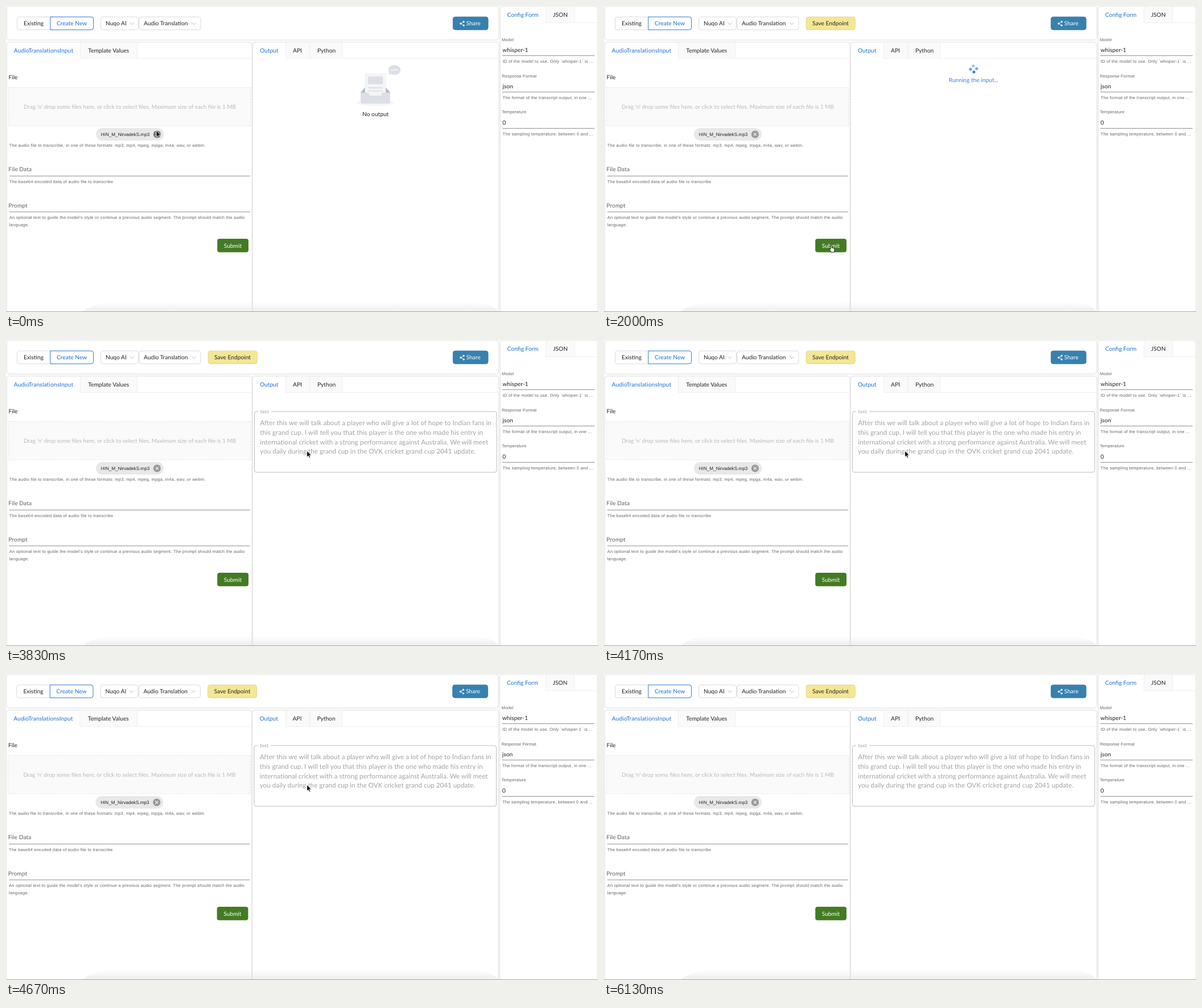
Recreate the animation shown at these times as an HTML page. Size 1040 by 539 pixels, loop 6.43 s.

```html
<!DOCTYPE html>
<html lang="en">
<head>
<meta charset="utf-8">
<title>Audio translation form</title>
<style>
  html, body { margin: 0; width: 100%; height: 100%; overflow: hidden; background: #fff; }
  svg { display: block; width: 100vw; height: 100vh; }
  text { font: 10.2px Lato, sans-serif; fill: #262626; text-rendering: geometricPrecision; white-space: pre; }
  .mid { text-anchor: middle; }
  .blue { fill: #1d6fd3; }
  .title { letter-spacing: .13px; }
  .pale { font-size: 9.96px; fill: #b9b9b9; }
  .label { fill: #606060; letter-spacing: .1px; }
  .value { fill: #222; letter-spacing: .04px; }
  .white { fill: #fff; }
  .note, .tiny { font: 7.5px "Liberation Sans", Arial, sans-serif; fill: #666; letter-spacing: .23px; }
  .tiny { letter-spacing: .1px; }
  .chip { font: 8.15px "Liberation Sans", Arial, sans-serif; fill: #222; text-anchor: middle; }
  .result { font-size: 11.6px; fill: #a2a2a2; letter-spacing: .06px; }
  .legend { font-size: 8.7px; fill: #a2a2a2; letter-spacing: .08px; }
  .panel { fill: #fff; stroke: #e8e8e8; filter: drop-shadow(0 0 1px #ddd); }
  .box { fill: #fff; stroke: #d9d9d9; }
  .tab { fill: #fafafa; stroke: #efefef; }
  .rule { stroke: #8f8f8f; }
  .thin { stroke: #efefef; }
  .chevron { fill: none; stroke: #bcbcbc; }
</style>
</head>
<body>
<svg viewBox="0 0 1040 539">
  <defs>
    <linearGradient id="shade" x2="0" y2="1">
      <stop offset="0" stop-color="#ddd" stop-opacity="0"/>
      <stop offset="1" stop-color="#ddd" stop-opacity=".5"/>
    </linearGradient>
  </defs>
  <g id="page">
    <rect class="panel" x="1.5" y=".5" width="864" height="59" rx="5"/>
    <rect class="panel" x="1.5" y="64" width="430.5" height="475" rx="4"/>
    <rect class="panel" x="433.5" y="64" width="432" height="475" rx="4"/>
    <rect class="panel" x="868.5" y=".5" width="171" height="539" rx="4"/>
    <path fill="url(#shade)" d="M135 538C150 526 175 521 205 521H815C842 521 858 528 865 538Z"/>
    <path stroke="#a6a6a6" d="M0 538.5H1040"/>

    <path class="thin" d="M131 92.5H431M491 92.5H865M948 29.5H1040"/>
    <g class="tab">
      <path d="M130.5 92.5V68q0-4 4-4H227q4 0 4 4V92.5Z"/>
      <path d="M491.5 92.5V68q0-4 4-4H529q4 0 4 4V92.5Z"/>
      <path d="M534.5 92.5V68q0-4 4-4H587q4 0 4 4V92.5Z"/>
      <path d="M948.5 29.5V4.5q0-4 4-4H995q4 0 4 4V29.5Z"/>
    </g>

    <rect class="box" x="19.5" y="19.2" width="66" height="22.7" rx="4"/>
    <path fill="#fff" stroke="#2a78d6" d="M77.8 19.2H149.6q4 0 4 4V37.9q0 4-4 4H77.8Z"/>
    <rect class="box" x="166.5" y="19.2" width="66" height="22.7" rx="4"/>
    <rect class="box" id="task" x="234" y="19.2" width="108" height="22.7" rx="4"/>
    <path class="chevron" d="M217.5 28.8l3.5 4 3.5-4M326.5 28.8l3.5 4 3.5-4"/>
    <rect x="785.3" y="19.2" width="61.6" height="22.7" rx="4" fill="#3781af" stroke="#3279a5"/>
    <g fill="#fff" stroke="#fff" stroke-width=".9">
      <path fill="none" d="M804 28l-5.3 3 5.3 3"/>
      <circle cx="804" cy="27.8" r="1.2"/><circle cx="798.7" cy="31" r="1.2"/><circle cx="804" cy="34.2" r="1.2"/>
    </g>

    <rect x="4.5" y="143.5" width="425.5" height="67.5" fill="#fafafa" stroke="#e4e4e4" stroke-dasharray="3 2"/>
    <rect x="158" y="215" width="119" height="22" rx="11" fill="#e8e8e8"/>
    <circle id="remove" cx="265.4" cy="226" r="6.6"/>
    <path stroke="#eee" stroke-width="1.2" d="M262.9 223.5l5 5m0-5l-5 5"/>
    <path class="rule" d="M6 299.5H429M6 362.7H429M872 87.5H1034M872 151.5H1034M872 215.5H1034"/>
    <rect x="371.2" y="409.9" width="54.8" height="23.8" rx="4" fill="#437b23"/>
    <g id="labels"></g>

    <g id="save">
      <rect x="355.2" y="19.2" width="86" height="22.7" rx="4" fill="#f4e794" stroke="#e0d698"/>
      <text class="mid" x="398" y="34.4">Save Endpoint</text>
    </g>
    <g id="empty">
      <g transform="translate(605 104) scale(.479)">
        <g transform="translate(24 31.67)">
          <ellipse cx="67.8" cy="106.9" rx="67.8" ry="12.7" fill="#f5f5f7"/>
          <path fill="#aeb8c2" d="M122 69.7L98 40.2q-2-2.2-4.6-2.2H42q-2.6 0-4.6 2.2L13.6 69.7V85H122Z"/>
          <rect x="29.8" width="76" height="101" rx="4" fill="#f5f5f7" stroke="#e3e5ea"/>
          <g fill="#dce0e6">
            <rect x="40.7" y="10" width="54.2" height="29" rx="2"/>
            <rect x="40.7" y="49.8" width="54.2" height="4.5" rx="2.2"/>
            <rect x="40.7" y="61.5" width="54.2" height="4.5" rx="2.2"/>
            <path d="M13.6 69.7H39.9q5.2 0 5.2 5.4 0 5.4 5.3 5.4H85.2q5.3 0 5.3-5.4 0-5.4 5.2-5.4H122V103.2q0 7.2-7 7.2H20.5q-6.9 0-6.9-7.2Z"/>
          </g>
        </g>
        <path fill="#dce0e6" d="M149 33.3l-6.8 2.6q-1.7 0-1.3-1.2l2-6.2a22.6 18.1 0 1 1 6.1 4.8Z"/>
        <path stroke="#fff" stroke-width="5.2" stroke-linecap="round" d="M152.5 18.1h0M161.4 18.1h0M170.2 18.1h0"/>
      </g>
      <text class="mid" x="649.2" y="194.2">No output</text>
    </g>
    <g id="running">
      <g id="spinner" fill="#3a86e8"></g>
      <text class="mid" x="649.2" y="134.4" style="fill:#3a80dc">Running the input...</text>
    </g>
    <g id="result">
      <path fill="none" stroke="#bbb" d="M443 126H440q-3.5 0-3.5 3.5V229.5q0 3.5 3.5 3.5H858.5q3.5 0 3.5-3.5V129.5q0-3.5-3.5-3.5H466"/>
      <text class="legend" x="446.5" y="128.8">text</text>
    </g>
  </g>

  <g id="cursor">
    <path id="arrow" fill="#111" stroke="#fff" stroke-width=".8" d="M0 0V11.3L2.6 8.9 4.3 12.9 6.2 12.1 4.5 8.2H8Z"/>
    <path id="hand" fill="#fff" stroke="#111" stroke-width=".9" stroke-linejoin="round" d="M-1 6.8V1Q-1 0 0 0 1 0 1 1V4.5Q2.5 3.8 3 5 4.3 4.3 4.8 5.5 6 5.2 6 6.5V9Q5.8 10.5 5 12.3H.3Q-.5 10.5-2.5 8.2-3.7 6.3-2.6 6.2-1.8 6.2-1 7.4Z"/>
  </g>
</svg>
<script>
const LOOP = 6430, STEP = 1000 / 6;
const $ = id => document.getElementById(id);

function add(parent, tag, attrs, content = "") {
  const node = document.createElementNS("http://www.w3.org/2000/svg", tag);
  for (const key in attrs) node.setAttribute(key, attrs[key]);
  node.textContent = content;
  return parent.appendChild(node);
}

function write(parent, style, rows) {
  for (const [x, y, content] of rows) add(parent, "text", { class: style, x, y }, content);
}

const labels = $("labels");
write(labels, "", [
  [31, 34.4, "Existing"], [175, 34.4, "Nuqo AI"], [242, 34.4, "Audio Translation"],
  [144.3, 81.6, "Template Values"], [504, 81.6, "API"], [547, 81.6, "Python"],
  [961, 19.3, "JSON"], [4.5, 129, "File"]
]);
write(labels, "blue", [[89, 34.4, "Create New"], [446, 81.6, "Output"], [880.5, 19.3, "Config Form"]]);
write(labels, "blue title", [[13.8, 81.6, "AudioTranslationsInput"]]);
write(labels, "white", [[808.5, 34.4, "Share"]]);
write(labels, "white mid", [[398.4, 425.6, "Submit"]]);
write(labels, "pale", [
  [31, 181.2, "Drag 'n' drop some files here, or click to select files. Maximum size of each file is 1 MB"]
]);
write(labels, "label", [[4.3, 291, "File Data"], [4.3, 355, "Prompt"]]);
write(labels, "value", [[872.3, 81, "whisper-1"], [872.3, 145, "json"], [872.3, 208.7, "0"]]);
write(labels, "chip", [[209.5, 229, "HIN_M_NirvadekS.mp3"]]);
write(labels, "tiny", [[871, 61.6, "Model"], [871, 125.6, "Response Format"], [871, 189.2, "Temperature"]]);
write(labels, "note", [
  [5.7, 247.8, "The audio file to transcribe, in one of these formats: mp3, mp4, mpeg, mpga, m4a, wav, or webm."],
  [5.7, 311.8, "The base64 encoded data of audio file to transcribe"],
  [5.7, 375.4, "An optional text to guide the model's style or continue a previous audio segment. The prompt should match the audio"],
  [5.7, 387.6, "language."],
  [872.5, 100.2, "ID of the model to use. Only `whisper-1` is ..."],
  [872.5, 164, "The format of the transcript output, in one ..."],
  [872.5, 227.8, "The sampling temperature, between 0 and ..."]
]);
write($("result"), "result", [
  "After this we will talk about a player who will give a lot of hope to Indian fans in",
  "this grand cup. I will tell you that this player is the one who made his entry in",
  "international cricket with a strong performance against Australia. We will meet",
  "you daily during the grand cup in the OVK cricket grand cup 2041 update."
].map((line, i) => [446.3, 150.2 + i * 16.7, line]));

const dots = [0, 1, 2, 3].map(i => {
  const angle = 3.56 + i * Math.PI / 2;
  return add($("spinner"), "circle", { cx: 5.4 * Math.cos(angle), cy: 5.4 * Math.sin(angle), r: 2.6 });
});

// Pointer stops: step, x, y
const route = [
  [0, 264, 219.5], [3, 290, 28], [4, 290, 28], [7, 404, 421.5], [9, 404, 421.5], [10, 399, 421.5],
  [21, 399, 421.5], [22, 480, 280], [23, 528.5, 195], [32, 528.5, 195], [35, 513, 36], [40, 513, 36]
];

function pointerAt(step) {
  const i = route.findIndex(stop => stop[0] > step);
  const [s0, x0, y0] = route[i - 1], [s1, x1, y1] = route[i];
  const p = (step - s0) / (s1 - s0), ease = p * p * (3 - 2 * p);
  return [x0 + (x1 - x0) * ease, y0 + (y1 - y0) * ease];
}

const show = (id, on) => $(id).setAttribute("visibility", on ? "visible" : "hidden");

function draw(now) {
  const time = now % LOOP;
  const step = Math.floor((time + 5) / STEP);
  const [x, y] = pointerAt(step);
  const overButton = step === 3 || step === 4 || (step >= 7 && step < 22);
  const gone = time >= 6130;

  $("cursor").setAttribute("transform", `translate(${x} ${y})`);
  show("arrow", !gone && !overButton);
  show("hand", !gone && overButton);

  show("save", step >= 11);
  show("empty", step < 11);
  show("running", step >= 11 && step < 19);
  show("result", step >= 19);
  $("task").style.stroke = step >= 4 && step < 11 ? "#3d8de0" : "";
  $("remove").setAttribute("fill", step < 1 ? "#777" : "#999");
  $("page").setAttribute("transform", `translate(${step >= 27 && step < 33 ? -.6 : 0} 0)`);

  const turn = step - 18;
  $("spinner").setAttribute("transform", `translate(649.3 111) rotate(${turn * 50})`);
  dots.forEach((dot, i) => dot.setAttribute("opacity", .74 + .26 * Math.cos(turn * .5 - i * Math.PI / 2)));
}

const start = performance.now();
function tick() {
  draw(performance.now() - start);
  requestAnimationFrame(tick);
}
tick();
</script>
</body>
</html>
```
